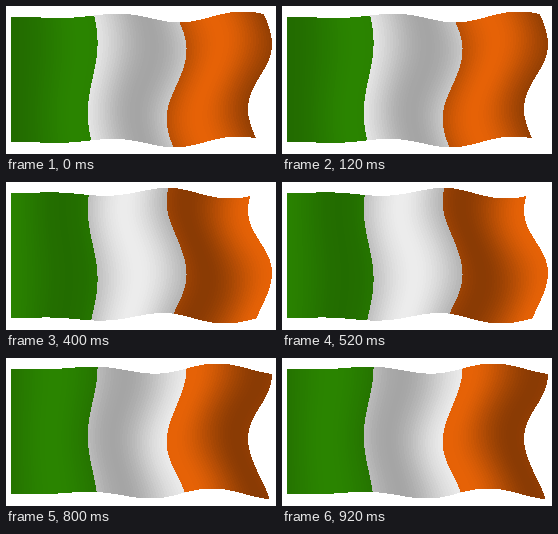
Write an HTML page that moves like this. It is 270 px wide and 148 px high and loops after 1 s.

```html
<!DOCTYPE html>
<html lang="en">
<head>
<meta charset="utf-8">
<title>Waving flag</title>
<style>
  html, body { margin: 0; width: 100%; height: 100%; overflow: hidden; background: #fff; }
  svg { display: block; width: 100vw; height: 100vh; }
</style>
</head>
<body>
<svg id="flag" viewBox="0 0 270 148" shape-rendering="crispEdges"></svg>
<script>
const STEP = 200, STEPS = 5;
const LEFT = 5, TOP = 11, WIDTH = 249, HEIGHT = 125;
const STRIPS = 32, ROWS = 24;
const BANDS = [
  { from: 0, to: 0.328, color: [42, 132, 0], depth: 0.18 },
  { from: 0.328, to: 0.665, color: [236, 236, 236], depth: 0.3 },
  { from: 0.665, to: 1, color: [230, 98, 6], depth: 0.4 }
];
const TAU = Math.PI * 2;
const clamp = x => Math.max(0, Math.min(1, x));

const svg = document.getElementById('flag');
const strips = BANDS.flatMap(band => Array.from({ length: STRIPS }, (_, i) => {
  const at = n => band.from + (band.to - band.from) * n / STRIPS;
  const path = svg.appendChild(document.createElementNS('http://www.w3.org/2000/svg', 'path'));
  return { path, band, u0: at(i), u1: at(Math.min(STRIPS, i + 1.4)), mid: at(i + 0.5) };
}));

// Sideways ripple runs down the cloth, vertical ripple runs to the right.
function point(u, v, step) {
  const sway = u < 2 / 3 ? 15 * u : 10 + 6 * (u - 2 / 3);
  const x = LEFT + WIDTH * u - sway * Math.cos(TAU * (v * 0.9 - (step - 1.5) / STEPS));
  const lift = 5.5 * clamp((x - 20) / 150);
  const crest = 107 + 26 * step - 5 * v;
  const y = TOP + HEIGHT * v - lift * Math.cos(TAU * (x - crest) / 130);
  return x.toFixed(2) + ' ' + y.toFixed(2);
}

function shade(band, u, step) {
  const x = LEFT + WIDTH * u;
  const fold = 0.5 + 0.5 * Math.cos(TAU * (x - 138 - 26 * step) / 130);
  const light = 1 - band.depth * fold;
  return `rgb(${band.color.map(c => Math.round(c * light)).join()})`;
}

function draw(step) {
  for (const { path, band, u0, u1, mid } of strips) {
    const points = [];
    for (let r = 0; r <= ROWS; r++) points.push(point(u0, r / ROWS, step));
    for (let r = ROWS; r >= 0; r--) points.push(point(u1, r / ROWS, step));
    path.setAttribute('d', 'M' + points.join('L') + 'Z');
    path.setAttribute('fill', shade(band, mid, step));
  }
}

const start = performance.now();
let shown = -1;
function tick() {
  const step = Math.floor((performance.now() - start) / STEP) % STEPS;
  if (step !== shown) draw(shown = step);
  requestAnimationFrame(tick);
}
tick();
</script>
</body>
</html>
```
